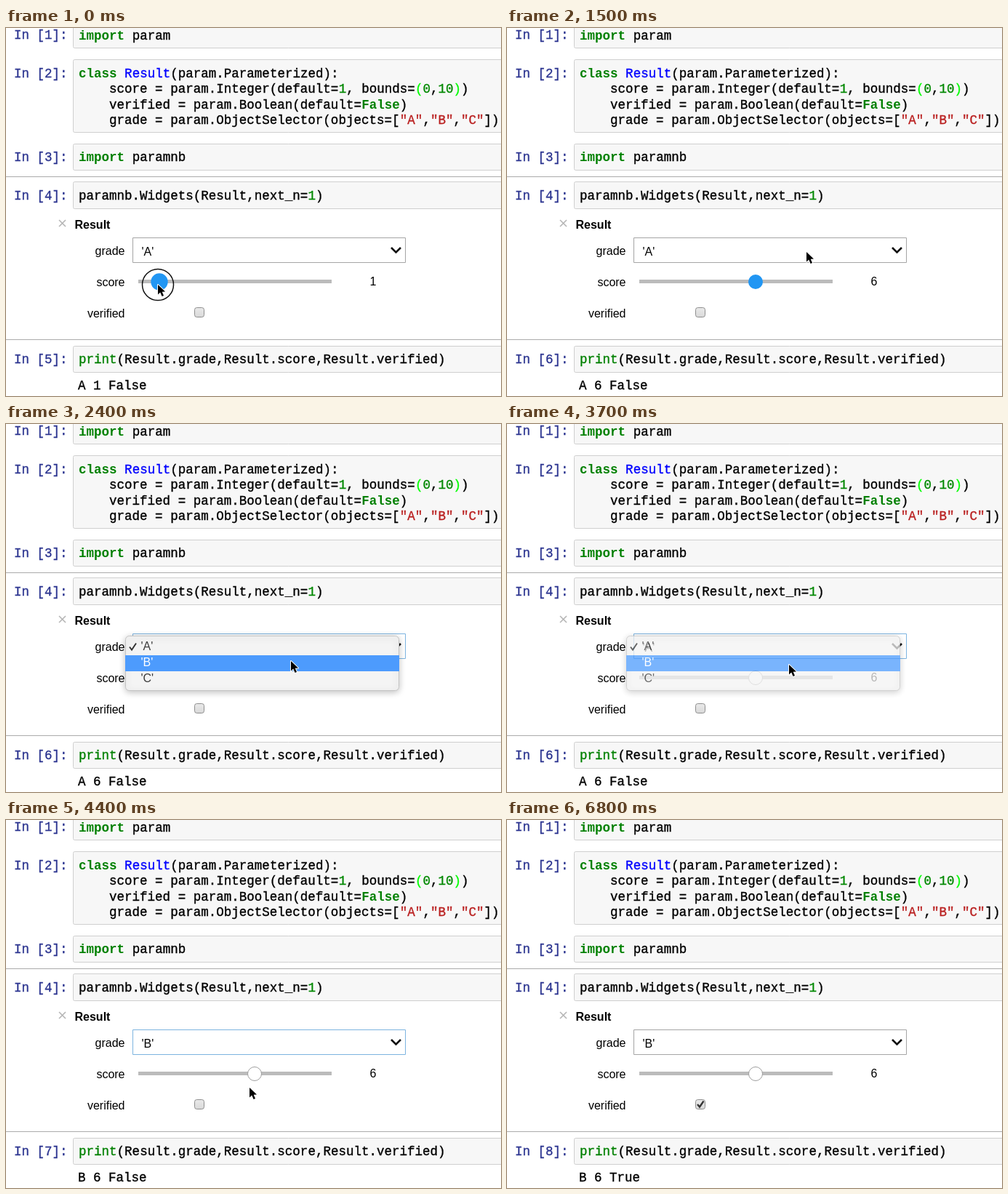
Recreate the animation shown at these times as an HTML page with a canvas. Size 681 px wide and 506 px high, loop 6.9 s.

```html
<!DOCTYPE html>
<html lang="en">
<head>
<meta charset="utf-8">
<title>Notebook widgets</title>
<style>
html, body { margin: 0; width: 100%; height: 100%; overflow: hidden; background: #fff; }
canvas { display: block; }
</style>
</head>
<body>
<canvas id="stage" width="681" height="506"></canvas>
<script>
const stage = document.getElementById('stage');
const main = stage.getContext('2d');
const layer = stage.cloneNode().getContext('2d');
let ctx = main;

const LOOP = 6900, STEP = 100;
const MONO = '17.53px "Liberation Mono", "Courier New", monospace';
const SANS = '16px "Liberation Sans", Arial, sans-serif';
const CHAR = 10.52, LEAD = 21.25;
const BLACK = '#000', KEY = '#008000', NUM = '#080', STR = '#ba2121', MATCH = '#0f0';

// Cursor stops: time, x, y
const PATH = [
  [0, 209, 353], [100, 209, 353], [500, 354, 355], [700, 354, 356], [800, 354, 356],
  [1500, 412, 308], [2000, 412, 308], [2400, 392, 326], [2900, 388, 331],
  [3800, 388, 331], [4400, 335, 368], [4900, 267, 392], [5600, 267, 392], [6200, 300, 525]
];
// Intervals in which the mouse button is shown as pressed
const CLICKS = [[0, 600], [1600, 2000], [3300, 3600], [5100, 5400]];
const MENU = { open: 1700, fade: 3600, close: 4000 };

function cursorAt(t) {
  for (let i = 1; i < PATH.length; i++) {
    const [t0, x0, y0] = PATH[i - 1], [t1, x1, y1] = PATH[i];
    if (t <= t1) {
      const p = (t - t0) / (t1 - t0), e = p * p * (3 - 2 * p);
      return { x: x0 + (x1 - x0) * e, y: y0 + (y1 - y0) * e };
    }
  }
  return { x: 300, y: 525 };
}

function text(str, x, y, color = BLACK, font = SANS, align = 'left') {
  ctx.font = font;
  ctx.fillStyle = color;
  ctx.textAlign = align;
  ctx.fillText(str, x, y);
}

// Parts are strings, or [string, colour, bold]; a hairline outline thickens regular type
function code(x, y, ...parts) {
  for (const part of parts) {
    const [str, color = BLACK, bold] = Array.isArray(part) ? part : [part];
    text(str, x, y, color, (bold ? 'bold ' : '') + MONO);
    if (!bold) {
      ctx.strokeStyle = color;
      ctx.lineWidth = 0.35;
      ctx.strokeText(str, x, y);
    }
    x += str.length * CHAR;
  }
}

function rect(x, y, w, h, color) {
  ctx.fillStyle = color;
  ctx.fillRect(x, y, w, h);
}

function box(x, y, w, h, r, fill, stroke) {
  ctx.beginPath();
  ctx.roundRect(x + 0.5, y + 0.5, w - 1, h - 1, r);
  ctx.fillStyle = fill;
  ctx.fill();
  ctx.strokeStyle = stroke;
  ctx.lineWidth = 1;
  ctx.stroke();
}

function line(points, width, color) {
  ctx.beginPath();
  points.forEach(([x, y]) => ctx.lineTo(x, y));
  ctx.strokeStyle = color;
  ctx.lineWidth = width;
  ctx.stroke();
}

function disc(x, y, r) {
  ctx.beginPath();
  ctx.arc(x, y, r, 0, Math.PI * 2);
}

function cell(n, top, bottom, baseline) {
  box(92, top, 610, bottom - top, 2, '#f7f7f7', '#cfcfcf');
  code(11, baseline - 0.5, ['In [' + n + ']:', '#2c3590']);
}

function drawCells(s) {
  cell(1, -20, 28, 15.5);
  code(100, 15.5, ['import', KEY, true], ' param');
  cell(2, 43, 144, 68);
  code(100, 68, ['class', KEY, true], ' ', ['Result', '#00f'], '(param.Parameterized):');
  code(100, 68 + LEAD, '    score = param.Integer(default=', ['1', NUM], ', bounds=',
    ['(', MATCH], ['0', NUM], ',', ['10', NUM], [')', MATCH], ')');
  code(100, 68 + 2 * LEAD, '    verified = param.Boolean(default=', ['False', KEY, true], ')');
  code(100, 68 + 3 * LEAD, '    grade = param.ObjectSelector(objects=[', ['"A"', STR], ',',
    ['"B"', STR], ',', ['"C"', STR], '])');
  cell(3, 159, 196, 183);
  code(100, 183, ['import', KEY, true], ' paramnb');
  rect(0, 204, 681, 1, '#ababab');
  cell(4, 211, 249, 236);
  code(100, 236, 'paramnb.Widgets(Result,next_n=', ['1', NUM], ')');
  rect(0, 428, 681, 1, '#ababab');
  cell(s.run, 437, 474, 461);
  code(100, 461, ['print', KEY], '(Result.grade,Result.score,Result.verified)');
  code(99, 497, s.output);
}

function drawWidgets(s) {
  line([[73, 264], [82, 273]], 1.6, '#b5b5b5');
  line([[82, 264], [73, 273]], 1.6, '#b5b5b5');
  text('Result', 94.5, 276, BLACK, 'bold ' + SANS);
  text('grade', 163.5, 312, BLACK, SANS, 'right');
  text('score', 163.5, 355, BLACK, SANS, 'right');
  text('verified', 163.5, 398, BLACK, SANS, 'right');

  box(174, 288, 376, 35, 0, '#fff', s.focus ? '#7db4e0' : '#a5a5a5');
  text("'" + s.grade + "'", 186.5, 313);
  line([[530, 302], [536.5, 308.5], [543, 302]], 2.6, '#111');

  rect(182, 346, 266, 5, '#bbb');
  disc(s.knob, 349, s.drag ? 11.7 : s.hot ? 10 : 9.5);
  ctx.fillStyle = s.hot ? '#2196f3' : '#fff';
  ctx.fill();
  if (!s.hot) {
    ctx.strokeStyle = '#9e9e9e';
    ctx.lineWidth = 1;
    ctx.stroke();
  }
  text(s.score, 505, 354, BLACK, SANS, 'center');

  const shade = ctx.createLinearGradient(0, 384, 0, 398);
  shade.addColorStop(0, '#eaeaea');
  shade.addColorStop(1, '#d8d8d8');
  box(259, 384, 14, 14, 3, shade, '#8e8e8e');
  if (s.verified) line([[262, 391], [265, 394.5], [270.5, 386.5]], 2.3, '#333');
}

function drawMenu(s) {
  ctx.save();
  ctx.shadowColor = 'rgba(0,0,0,.25)';
  ctx.shadowBlur = 10;
  ctx.shadowOffsetY = 2;
  box(164, 291, 377, 76, 5, '#f4f4f4', '#c4c4c4');
  ctx.restore();
  rect(164, 296 + 22 * s.row, 377, 22, '#4d9bfd');
  ['A', 'B', 'C'].forEach((name, i) =>
    text("'" + name + "'", 185.5, 311 + 22 * i, i === s.row ? '#fff' : '#3c3c3c'));
  line([[170, 306.5], [173, 310.5], [179, 301.5]], 1.9, s.row ? '#333' : '#fff');
}

// The menu fades as one flattened layer
function blendMenu(s) {
  ctx = layer;
  ctx.clearRect(0, 0, 681, 506);
  drawMenu(s);
  ctx = main;
  ctx.globalAlpha = s.menu;
  ctx.drawImage(layer.canvas, 0, 0);
  ctx.globalAlpha = 1;
}

function drawCursor({ x, y }, pressed) {
  if (pressed) {
    disc(x, y, 21.5);
    ctx.strokeStyle = '#111';
    ctx.lineWidth = 1.5;
    ctx.stroke();
  }
  ctx.save();
  ctx.translate(x, y);
  ctx.beginPath();
  [[0, 0], [0, 13.5], [3.2, 10.6], [5.6, 16], [8, 15], [5.7, 9.8], [10, 9.6]]
    .forEach(([px, py]) => ctx.lineTo(px, py));
  ctx.closePath();
  ctx.lineJoin = 'round';
  ctx.strokeStyle = '#fff';
  ctx.lineWidth = 2;
  ctx.stroke();
  ctx.fillStyle = BLACK;
  ctx.fill();
  ctx.restore();
}

function stateAt(t) {
  const cursor = cursorAt(t);
  const score = t < 700 ? Math.max(1, Math.min(6, Math.round((cursor.x - 184.8) / 26.2))) : 6;
  const run = 5 + [700, 4100, 5400].filter(at => t >= at).length;
  const open = t >= MENU.open && t < MENU.close;
  return {
    cursor, score, run,
    output: ['A 1 False', 'A 6 False', 'B 6 False', 'B 6 True'][run - 5],
    knob: 184.8 + 26.2 * score,
    drag: t < 600,
    hot: t < 1600,
    focus: t >= 2000 && t < 5200,
    grade: t < 3900 ? 'A' : 'B',
    verified: t >= 5300,
    menu: open ? Math.min(1, 1 - (t - MENU.fade) / (MENU.close - MENU.fade)) : 0,
    row: cursor.y >= 318 ? 1 : 0,
    pressed: CLICKS.some(([from, to]) => t >= from && t < to)
  };
}

function frame(now) {
  const t = Math.floor((now % LOOP) / STEP) * STEP;
  const s = stateAt(t);
  rect(0, 0, 681, 506, '#fff');
  drawCells(s);
  drawWidgets(s);
  if (s.menu > 0) blendMenu(s);
  drawCursor(s.cursor, s.pressed);
}

const start = performance.now();
function tick() {
  frame(performance.now() - start);
  requestAnimationFrame(tick);
}
tick();
</script>
</body>
</html>
```
